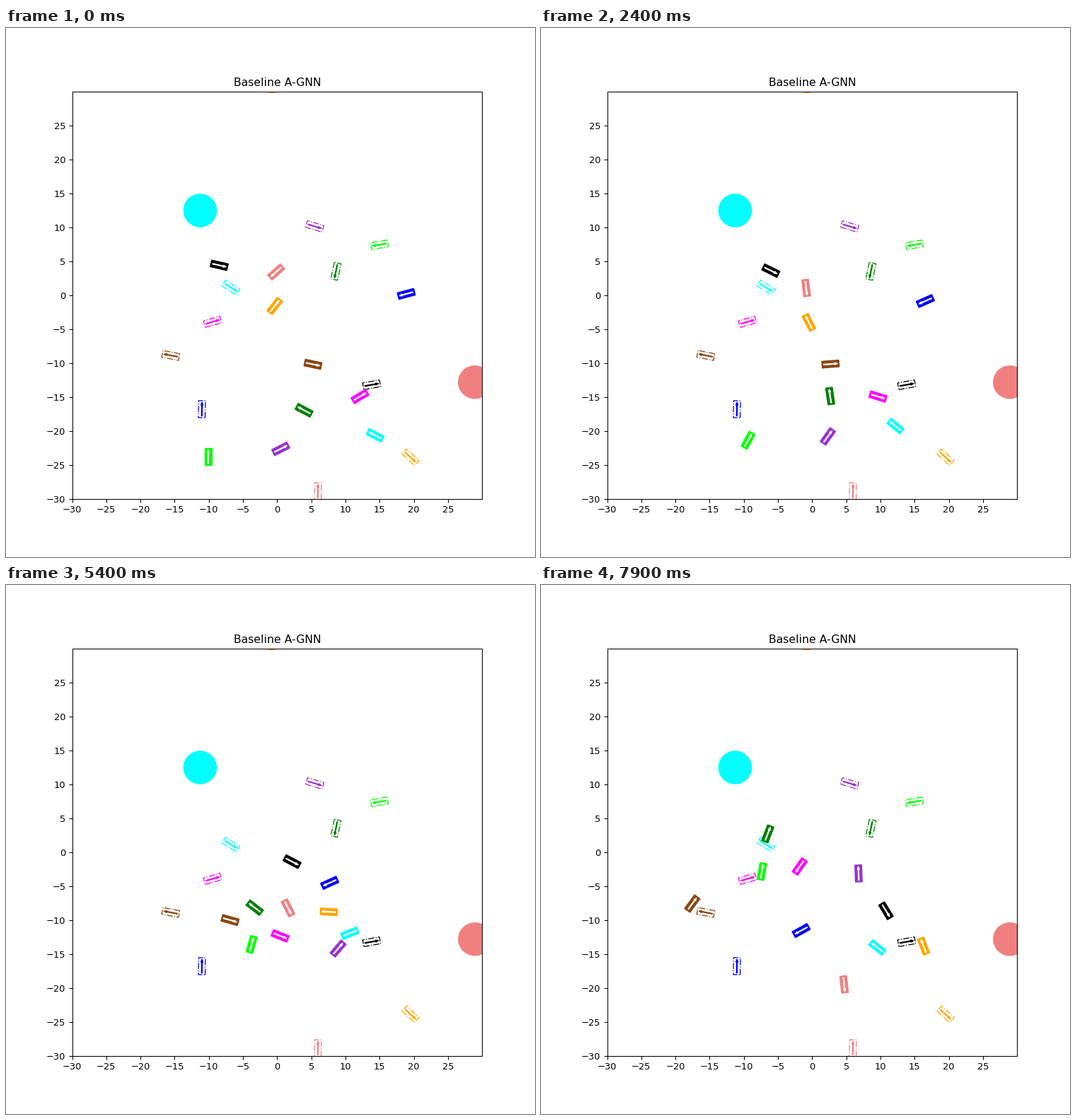
Write a matplotlib script that moves like this. It is 748 px wide and 748 px high and loops after 8000 ms.

```python
import numpy as np
import matplotlib.pyplot as plt
from matplotlib.animation import FuncAnimation
from matplotlib.patches import Circle, Polygon

SIZE, FRAMES, STEP_MS = 748, 80, 100
SUB = 8  # integration steps per frame

# Start (pixels), then heading at the start, mean heading on each leg,
# and heading at the end (degrees)
CARS = {
    "black": ((301.5, 335.5), [-13, -13, -26, -30, -33, -28, -59, -59]),
    "lightcoral": ((382, 345), [222, 236, 275, 277, 293, 290, 278, 276]),
    "orange": ((380, 393), [52, 68, 118, 144, 163, 172, 114, 111]),
    "blue": ((566, 376), [195, 203, 205, 207, 197, 220, 212, 209]),
    "saddlebrown": ((434, 475.5), [-12, -5, 4, 2, -6, -25, 9, 54]),
    "green": ((421.5, 540.5), [152, 139, 102, 126, 152, 115, 93, 69]),
    "magenta": ((500.5, 521), [31, 13, -17, -20, -9, -60, -105, -125]),
    "cyan": ((522, 576), [152, 152, 141, 128, 59, -55, -202, -218]),
    "lime": ((286, 606.4), [90, 82, 62, 55, 51, 114, 100, 80]),
    "darkorchid": ((388.5, 595), [27, 39, 55, 55, 30, 98, 105, 92]),
}
REVERSING = {"orange", "saddlebrown", "magenta"}

GOALS = {
    "black": (517, 504.5, 10),
    "lightcoral": (441, 655, 89),
    "orange": (572, 607, -43),
    "blue": (277, 539, 89),
    "saddlebrown": (233, 463, 169),
    "green": (466.5, 344, 258),
    "magenta": (292, 415.5, 16),
    "cyan": (318, 367, -32),
    "lime": (528, 306.5, 190),
    "darkorchid": (436.5, 280.5, -17),
}

BOX = np.array([(-1.25, -0.5), (1.25, -0.5), (1.25, 0.5), (-1.25, 0.5)])
ARROW = np.array([(-1, -0.05), (0.6, -0.05), (0.6, -0.16), (1.04, 0),
                  (0.6, 0.16), (0.6, 0.05), (-1, 0.05)])


def travelled(t):
    """Pixels driven after t frames: speed rises from rest and levels off."""
    return t ** 2 * (0.0504 - 0.00016 * t)


LEGS = travelled(np.array([0, 15, 31, 42, 53, 69, 78]))


def to_data(p):
    """Stage pixels to axes units for the default subplot box."""
    x = (p[0] / SIZE - 0.125) / 0.775 * 60 - 30
    y = (0.89 - p[1] / SIZE) / 0.77 * 60 - 30
    return np.array([x, y])


def place(shape, pos, deg):
    a = np.radians(deg)
    c, s = np.cos(a), np.sin(a)
    return shape @ np.array([(c, s), (-s, c)]) + to_data(pos)


def steer(s, first, means, last):
    """Smooth heading over distance s that has the given mean on each leg."""
    size = np.diff(LEGS)
    n = len(size)
    m, rhs = np.eye(n + 1), np.zeros(n + 1)
    rhs[0], rhs[n] = first, last
    for k in range(1, n):
        a, b = 1 / size[k - 1], 1 / size[k]
        m[k, k - 1:k + 2] = a, 2 * (a + b), b
        rhs[k] = 3 * (means[k - 1] * a + means[k] * b)
    h = np.linalg.solve(m, rhs)
    k = np.clip(np.searchsorted(LEGS, s) - 1, 0, n - 1)
    u = (s - LEGS[k]) / size[k]
    return (h[k] * (1 - u) * (1 - 3 * u) + h[k + 1] * u * (3 * u - 2)
            + 6 * np.array(means)[k] * u * (1 - u))


def drive(start, turns, sign):
    """Pose at every frame; the first one is held for two frames."""
    s = travelled(np.arange((FRAMES - 2) * SUB + 1) / SUB)
    deg = steer(s, turns[0], turns[1:-1], turns[-1])
    a = np.radians((deg[1:] + deg[:-1]) / 2)
    moves = sign * np.diff(s) * np.array([np.cos(a), -np.sin(a)])
    path = np.cumsum(np.column_stack([start, moves]), axis=1)
    poses = list(zip(*path[:, ::SUB], deg[::SUB]))
    return poses[:1] + poses


fig, ax = plt.subplots(figsize=(8, 8), dpi=SIZE / 8)
ax.set(xlim=(-30, 30), ylim=(-30, 30), title="Baseline A-GNN",
       xticks=range(-30, 30, 5), yticks=range(-30, 30, 5))

for x, y, color in [(-11.27, 12.47, "cyan"), (28.94, -12.82, "lightcoral"),
                    (-0.81, 32.22, "orange")]:
    ax.add_patch(Circle((x, y), 2.4, color=color, lw=1))


def add_shape(shape, pose, **style):
    x, y, deg = pose
    patch = Polygon(place(shape, (x, y), deg), lw=1, joinstyle="miter", **style)
    return ax.add_patch(patch)


for color, pose in GOALS.items():
    add_shape(BOX, pose, fill=False, ec=color, ls="-.")
    add_shape(ARROW, pose, color=color)

cars = []
for color, (start, turns) in CARS.items():
    poses = drive(start, turns, -1 if color in REVERSING else 1)
    body = add_shape(BOX, poses[0], color=color, zorder=2)
    arrow = add_shape(ARROW, poses[0], color="white", zorder=2)
    cars.append((poses, body, arrow))


def update(i):
    for poses, body, arrow in cars:
        x, y, deg = poses[i]
        body.set_xy(place(BOX, (x, y), deg))
        arrow.set_xy(place(ARROW, (x, y), deg))
    return []


anim = FuncAnimation(fig, update, frames=FRAMES, interval=STEP_MS,
                     init_func=lambda: update(0), repeat=True,
                     repeat_delay=0, blit=False)
plt.show()
```
